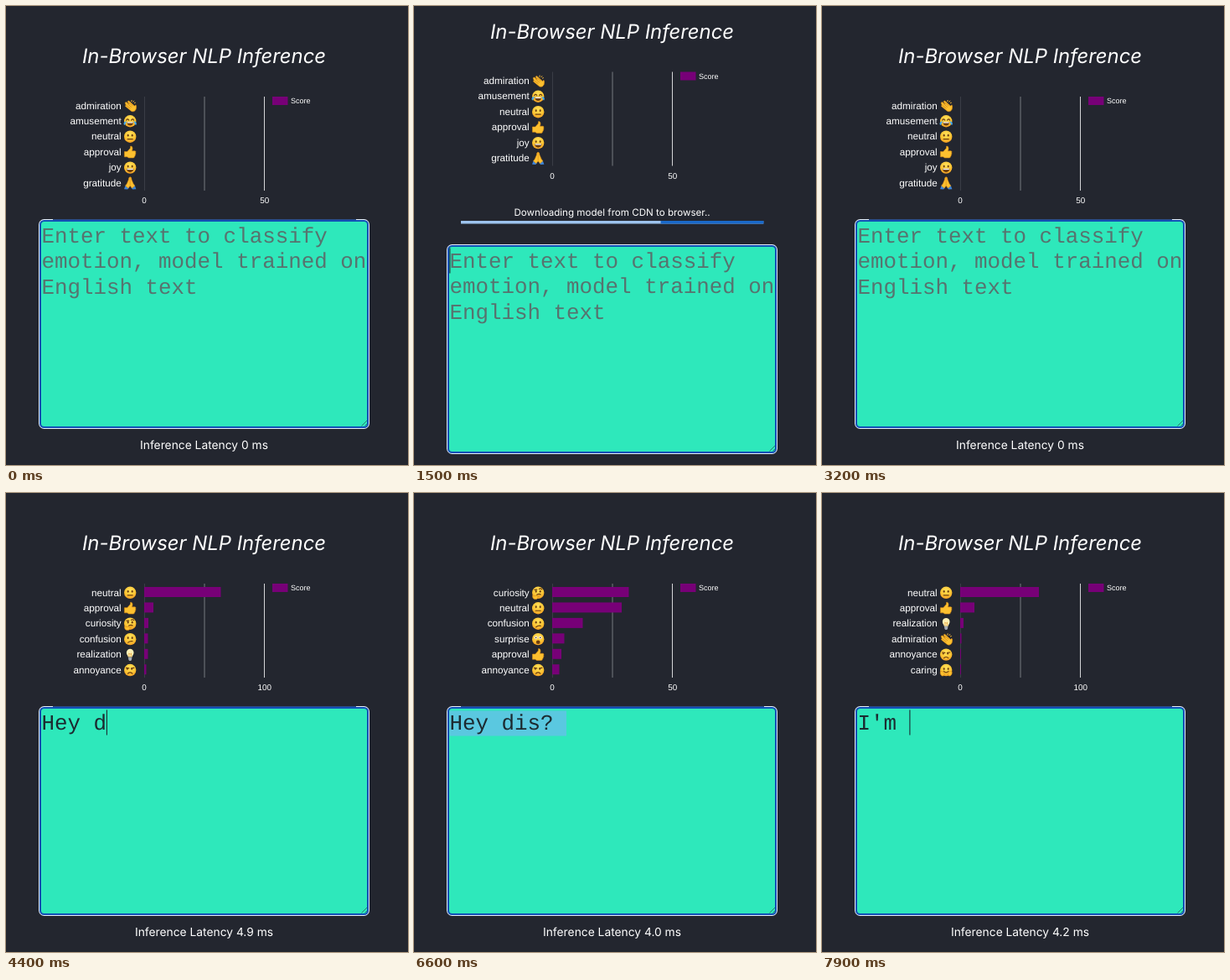
Animation, 480 px wide and 547 px high, one loop 8 s. Source, as an HTML page:

```html
<!DOCTYPE html>
<html lang="en">
<head>
<meta charset="utf-8">
<title>In-Browser NLP Inference</title>
<style>
  html, body { margin: 0; width: 100%; height: 100%; overflow: hidden; background: #23262f; }
  svg { display: block; width: 480px; height: 547px; }
  text { white-space: pre; fill: #fff; font-family: Inter, sans-serif; font-optical-sizing: none; text-rendering: geometricPrecision; }
  .mid { text-anchor: middle; }
  .title { font-size: 23.9px; font-style: italic; }
  .note { font-size: 11.6px; }
  .info { font-size: 13.8px; }
  .link { fill: #521060; }
  .chart text { font-family: "Liberation Sans", Arial, sans-serif; }
  .chart .label { font-size: 11.7px; text-anchor: end; }
  .chart .axis { font-size: 9.9px; text-anchor: middle; }
  .chart .legend { font-size: 9px; }
  .bar { fill: #770077; }
  .field text { font-family: "Liberation Mono", "Courier New", monospace; font-size: 25.85px; fill: #1c2a30; }
  .field .hint text { fill: #57736f; }
  .ink { fill: none; stroke: #6b3d10; stroke-width: 1.2; stroke-linecap: round; }
  .dot { fill: #6b3d10; }
  .hand { fill: #fdc02f; stroke: #d98a15; stroke-width: .6; stroke-linejoin: round; }
</style>
</head>
<body>
<svg viewBox="0 0 480 547">
  <defs>
    <radialGradient id="skin" cx=".5" cy=".3" r=".75">
      <stop offset="0" stop-color="#ffe05a"/>
      <stop offset=".6" stop-color="#fcc433"/>
      <stop offset="1" stop-color="#ef9420"/>
    </radialGradient>
    <clipPath id="track"><rect x="56" y="226" width="361.5" height="3.4"/></clipPath>

    <circle id="face" r="7.2" fill="url(#skin)"/>
    <g id="eyes" class="dot"><ellipse cx="-2.5" cy="-1.5" rx="1" ry="1.4"/><ellipse cx="2.5" cy="-1.5" rx="1" ry="1.4"/></g>

    <g id="neutral"><use href="#face"/><use href="#eyes"/><path class="ink" d="M-3 3H3"/></g>
    <g id="joy"><use href="#face"/><use href="#eyes"/>
      <path class="dot" d="M-4.3 1.2H4.3C4 7-4 7-4.3 1.2Z"/><path d="M-3.7 1.2H3.7V2.5H-3.7Z" fill="#fff"/></g>
    <g id="amusement"><use href="#face"/>
      <path class="ink" d="M-4.5-1.2Q-3-3.5-1.4-1.2M1.4-1.2Q3-3.5 4.5-1.2"/>
      <path class="dot" d="M-4 1H4C4 6.6-4 6.6-4 1Z"/><path d="M-3.5 1H3.5V2.3H-3.5Z" fill="#fff"/>
      <path d="M-4.3 0Q-8.5 1-7.5 3.8T-4.3 0M4.3 0Q8.5 1 7.5 3.8T4.3 0" fill="#43a9ee"/></g>
    <g id="curiosity"><use href="#face"/><use href="#eyes"/>
      <path class="ink" d="M-4.2-3.4L-1.4-3.6M1.2-4.4Q3-5.6 4.6-4M-1.5 2.4Q1 1 3 2.2"/>
      <path class="hand" d="M-6.6 3.4Q-5.8 2.5-5 4L1.8 3.2Q3 4-1 5L0 6Q-1 8.2-4 7.8Q-7 7.2-6.6 3.4Z"/></g>
    <g id="confusion"><use href="#face"/><use href="#eyes"/><path class="ink" d="M-2.5 4Q0 2 3 2.6"/></g>
    <g id="annoyance"><use href="#face"/>
      <path class="ink" d="M-4.6-2.6L-1.4-2.2M1.4-2.2L4.6-2.6M-2.6 4Q0 1.8 2.6 4"/>
      <circle class="dot" cx="-3.4" cy="-1.2" r="1"/><circle class="dot" cx="2" cy="-1.2" r="1"/></g>
    <g id="surprise"><use href="#face"/>
      <g fill="#fff"><circle cx="-2.6" cy="-1.8" r="1.8"/><circle cx="2.6" cy="-1.8" r="1.8"/></g>
      <g class="dot"><circle cx="-2.6" cy="-1.8" r=".9"/><circle cx="2.6" cy="-1.8" r=".9"/><ellipse cy="3.6" rx="2.4" ry="2.2"/></g></g>
    <g id="caring"><use href="#face"/><use href="#eyes"/><path class="ink" d="M-2.8 1.4Q0 4.4 2.8 1.4"/>
      <path class="hand" d="M-7 2Q-4-.2-2 4.6Q-2 7.5-5 7Q-7.6 5-7 2ZM7 2Q4-.2 2 4.6Q2 7.5 5 7Q7.6 5 7 2Z"/></g>
    <g id="admiration">
      <path class="hand" d="M-6-3.4Q-5-5-3.6-3.6L-1-1.6L-3-5Q-2-6.6-1-5.4L5.4.4L6.6-1Q8 0 7 4.2Q5.4 8 1.6 6.6L-5.4 1Q-6.4 0-5 -.6L-6-3.4Z"/>
      <path class="ink" style="stroke:#c77d18;stroke-width:.7" d="M-4.6-.4L0 3M-3-2L1.6 1.6M-1-3.4L3 0"/>
      <path d="M2-6.8L1.6-4.6M4.8-6L3.4-4.2M6.6-3.8L4.8-3" fill="none" stroke="#f3b53a"/></g>
    <g id="approval">
      <path class="hand" d="M-6.8-.6H-3.4L.2-4.6L.4-7Q3-7.4 2.8-3.6L2.2-1.4H6Q7.4-.6 6.4.8Q7.4 2 6 3Q6.6 4.4 5.2 5Q5.4 6.6 3.8 6.8H-1.6L-3.6 5.6H-6.8Z"/></g>
    <g id="gratitude">
      <path d="M-7.2 7.2L-5.4 2.4L-1 5.4L-3 7.4ZM7.2 7.2L5.4 2.4L1 5.4L3 7.4Z" fill="#3f86d8"/>
      <path class="hand" d="M0-7.2Q-1.6-7.4-1.8-4L-3.8.6L-5.6 3.2L-2.4 6L0 3.4L2.4 6L5.6 3.2L3.8.6L1.8-4Q1.6-7.4 0-7.2V3.4"/></g>
    <g id="realization">
      <path d="M-2.4 3Q-2.6 1.4-3.8 0Q-5.2-3 -3-5.6Q0-8 3-5.6Q5.2-3 3.8 0Q2.6 1.4 2.4 3Z" fill="#fff0b5"/>
      <path d="M-1.2 2.6L-1.4-1.6L0-.4L1.4-1.6L1.2 2.6" fill="none" stroke="#e6a53a" stroke-width=".8"/>
      <path d="M-2.2 3.3H2.2L1.8 6.4L.8 7.3H-.8L-1.8 6.4Z" fill="#a5abb4"/></g>
  </defs>

  <rect width="480" height="547" fill="#23262f"/>

  <g id="head">
    <text class="title mid" x="236.5" y="68.2">In-Browser NLP Inference</text>
    <g id="chart" class="chart">
      <path d="M165.5 108V220" stroke="#3a3d46"/>
      <path d="M237 108V220" stroke="#777a80"/>
      <path d="M308.5 108V220" stroke="#d4d5d8"/>
      <rect class="bar" x="318" y="108" width="18.5" height="10"/>
      <text class="legend" x="340" y="116.3">Score</text>
      <text class="axis" x="165" y="235.2">0</text>
      <text class="axis" x="308.7" y="235.2" id="limit"></text>
      <g id="rows"></g>
    </g>
  </g>

  <g id="body">
    <g id="progress">
      <text class="note mid" x="236.5" y="219.8">Downloading model from CDN to browser..</text>
      <g clip-path="url(#track)">
        <rect x="56" y="226" width="361.5" height="4" fill="#9dc3ee"/>
        <g fill="#1a69c9"><rect id="sweep1" y="226" height="4"/><rect id="sweep2" y="226" height="4"/></g>
      </g>
    </g>
    <g class="field">
      <rect x="39" y="254" width="395" height="250" rx="6.5" fill="#e6eefa"/>
      <path id="dim" d="M56 254.5H418" stroke="#2b4a86"/>
      <rect x="40" y="255" width="393" height="248" rx="5.5" fill="#1250b5"/>
      <rect x="42" y="257" width="389" height="244" rx="3.5" fill="#2ee8bb"/>
      <path d="M424.5 500.5L431 494M428.5 500.5L431 498" stroke="#2c6f68" stroke-width=".9"/>
      <rect id="selection" x="42.3" y="259.5" width="139.7" height="30" fill="#5ac8e0"/>
      <g id="hint" class="hint">
        <text x="42.5" y="282">Enter text to classify</text>
        <text x="42.5" y="312.3">emotion, model trained on</text>
        <text x="42.5" y="342.6">English text</text>
      </g>
      <text id="typed" x="42.5" y="282"></text>
      <rect id="caret" y="258.5" width="1.1" height="30" fill="#1c2a30"/>
    </g>
    <text id="latency" class="info mid" x="236.5" y="528"></text>
    <text class="info link mid" x="236.5" y="558">Quilba browser-ml-inference</text>
  </g>
</svg>

<script>
const LOOP = 8000, AXIS = 165, CHAR = 15.51, BLINK = 500;
const $ = id => document.getElementById(id);

// Each layout: start, shift of heading, shift of body, chart shown, progress shown
const layouts = [
  [0, 0, 0, true, false],
  [500, 60.5, -60, false, true],
  [900, -29.5, 30, true, true],
  [2300, 0, 0, true, false]
];

// Each result: latency, axis limit, then label and bar width in px
const results = {
  idle: ['0', 50, { admiration: 0, amusement: 0, neutral: 0, approval: 0, joy: 0, gratitude: 0 }],
  hey: ['4.9', 100, { neutral: 91.5, approval: 11, curiosity: 5, confusion: 4.5, realization: 4.5, annoyance: 2.5 }],
  ask: ['4.0', 50, { curiosity: 91.5, neutral: 83, confusion: 36.5, surprise: 14.5, approval: 11, annoyance: 8.5 }],
  im: ['4.2', 100, { neutral: 94, approval: 17, realization: 4, admiration: 1.5, annoyance: 1, caring: 1 }]
};

// Each edit: time, text in the field, result
const edits = [
  [0, '', 'idle'], [500, '', 'idle'],
  [3600, 'H', 'hey'], [3800, 'He', 'hey'], [4000, 'Hey', 'hey'], [4200, 'Hey ', 'hey'],
  [4400, 'Hey d', 'hey'], [4700, 'Hey di', 'hey'], [4900, 'Hey dis', 'hey'],
  [5200, 'Hey dis?', 'ask'], [5400, 'Hey dis? ', 'ask'],
  [7100, 'I', 'im'], [7300, "I'", 'im'], [7500, "I'm", 'im'], [7700, "I'm ", 'im']
];
const SELECT = [5900, 7100];

const latest = (list, t) => list.filter(e => e[0] <= t).pop();
const show = (id, on) => $(id).setAttribute('display', on ? 'inline' : 'none');
const shift = (id, y) => $(id).setAttribute('transform', `translate(0 ${y})`);

function bezier(x1, y1, x2, y2) {
  const at = (a, b, s) => 3 * a * s * (1 - s) ** 2 + 3 * b * s * s * (1 - s) + s ** 3;
  return x => {
    let lo = 0, hi = 1;
    for (let i = 0; i < 24; i++) {
      const mid = (lo + hi) / 2;
      if (at(x1, x2, mid) < x) lo = mid; else hi = mid;
    }
    return at(y1, y2, lo);
  };
}

// Indeterminate progress: both edges travel at their own pace, in % of the track
const SWEEP = 1140;
const sweeps = [
  { id: 'sweep1', start: 519, ease: bezier(.65, .815, .735, .395), left: [-35, 100], right: [0, 190] },
  { id: 'sweep2', start: 1560, ease: bezier(.165, .84, .44, 1), left: [-200, 107], right: [0, 108] }
];

function drawSweep({ id, start, ease, left, right }, t) {
  const p = ease(Math.min(1, Math.max(0, (t - start) / SWEEP)));
  const edge = ([a, b]) => 56 + (a + (b - a) * p) * 3.615;
  $(id).setAttribute('x', edge(left));
  $(id).setAttribute('width', Math.max(0, edge(right) - edge(left)));
}

let shown;
function drawResult(name) {
  if (name === shown) return;
  shown = name;
  const [ms, limit, scores] = results[name];
  $('latency').textContent = `Inference Latency ${ms} ms`;
  $('limit').textContent = limit;
  $('rows').innerHTML = Object.entries(scores).map(([label, width], i) => {
    const y = 118.3 + 18.45 * i;
    return `<text class="label" x="137.7" y="${y + 4.2}">${label}</text>
      <use href="#${label}" x="148.2" y="${y + .5}"/>
      <rect class="bar" x="${AXIS}" y="${y - 6.3}" width="${width}" height="12"/>`;
  }).join('');
}

function render(t) {
  const [, headY, bodyY, chart, loading] = latest(layouts, t);
  shift('head', headY);
  shift('body', bodyY);
  show('chart', chart);
  show('progress', loading);
  show('dim', !loading);
  sweeps.forEach(s => drawSweep(s, t));

  const [since, text, result] = latest(edits, t);
  const selected = t >= SELECT[0] && t < SELECT[1];
  drawResult(result);
  $('typed').textContent = text;
  show('hint', !text);
  show('selection', selected);
  show('caret', since > 0 && !selected && Math.floor((t - since) / BLINK) % 2 === 0);
  $('caret').setAttribute('x', 42.3 + text.length * CHAR);
}

const begin = performance.now();
function tick() {
  render((performance.now() - begin) % LOOP);
  requestAnimationFrame(tick);
}
tick();
</script>
</body>
</html>
```
